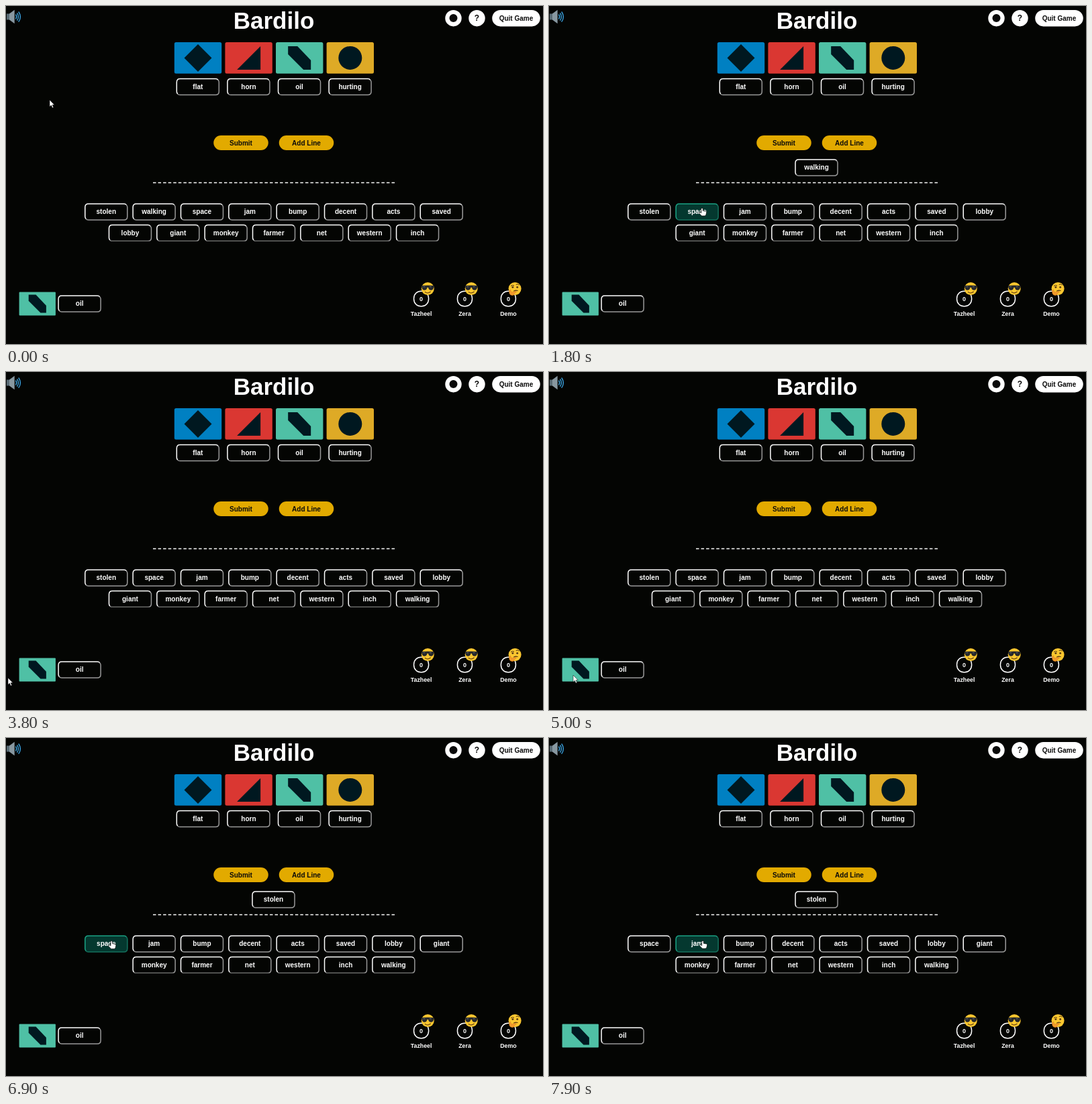
Animation, 800 px wide and 504 px high, one loop 8000 ms. Source, as an HTML page:

```html
<!DOCTYPE html>
<html lang="en">
<head>
<meta charset="utf-8">
<title>Word game</title>
<style>
  html, body { margin: 0; width: 100%; height: 100%; overflow: hidden; background: #040503; }
  svg { display: block; width: 800px; height: 504px; }
  text {
    font: bold 10px "Liberation Sans", Arial, sans-serif;
    fill: #fff; text-anchor: middle;
  }
  .dark { fill: #0a0a0a; }
  .box { fill: #040503; }
  .lit, .dim { fill: none; stroke: #fff; stroke-width: 1.5; }
  .dim { stroke: #999; }
  .hover .box { fill: #04382f; }
  .hover .lit { stroke: #1aa284; }
  .hover .dim { stroke: #14705c; }
</style>
</head>
<body>
<svg id="stage" viewBox="0 0 800 504" xmlns="http://www.w3.org/2000/svg"></svg>
<script>
const LOOP = 8000, STEP = 100;
const MID = 399, GAP = 71.35, PER_ROW = 8;
const LINE = { x: 398.5, y: 241 };
const INK = '#001820', GREEN = '#4fc0a5', GOLD = '#e2aa00';

const WORDS = ('stolen walking space jam bump decent acts saved ' +
  'lobby giant monkey farmer net western inch').split(' ');

// Pointer stops: time, x, y
const STOPS = [
  [0, 65, 140], [300, 16, 9], [600, 331, 150], [900, 223, 300], [1100, 229, 301],
  [1200, 229, 301], [1600, 225, 303], [1800, 228, 301], [1900, 227, 302],
  [2200, 227, 302], [2600, 402, 235], [2900, 402, 235], [3800, 3, 456],
  [4100, 58, 465], [4400, 148, 452], [4700, 96, 437], [5000, 36, 452],
  [5300, 84, 403], [5450, 146, 424], [5600, 74, 441], [6200, 129, 322],
  [6400, 150, 303], [6800, 150, 303], [7300, 219, 297], [7500, 236, 304],
  [7700, 247, 305], [7800, 266, 304], [7900, 229, 302], [8000, 229, 302]
];

const label = (x, y, str, size = 10, cls = '') =>
  `<text x="${x}" y="${y}" class="${cls}" style="font-size:${size}px">${str}</text>`;
const rect = (x, y, w, h, r, fill) =>
  `<rect x="${x}" y="${y}" width="${w}" height="${h}" rx="${r}" fill="${fill}"/>`;
const circle = (x, y, r, fill) => `<circle cx="${x}" cy="${y}" r="${r}" fill="${fill}"/>`;
const path = (d, fill, extra = '') => `<path d="${d}" fill="${fill}" ${extra}/>`;
const stroke = (d, color, w) =>
  path(d, 'none', `stroke="${color}" stroke-width="${w}" stroke-linecap="round"`);
const at = (x, y, inner, more = '') => `<g transform="translate(${x} ${y})" ${more}>${inner}</g>`;

// Outset button centred on its own origin
const button = str =>
  '<rect class="box" x="-32" y="-12" width="64" height="24" rx="5"/>' +
  '<path class="dim" d="M30.1-10.3Q31.5-9 31.5-7V7Q31.5 12 26.5 12H-26.5Q-29 12-30.1 10.5"/>' +
  '<path class="lit" d="M-30.1 10.5Q-31.5 9-31.5 7V-7Q-31.5-12-26.5-12H26.5Q29-12 30.1-10.3"/>' +
  label(0, 3.1, str);

const pill = (x, y, w, h, fill, str) =>
  rect(x - w / 2, y - h / 2, w, h, h / 2, fill) + label(x, y + 3.5, str, 10, 'dark');

const slab = path('M-17-17.5H-3L17 3.5V17.5H6L-17-5.5Z', INK);

function cards() {
  const list = [
    ['flat', '#0080c2', path('M0-20.5L20.5 0 0 20.5-20.5 0Z', INK)],
    ['horn', '#da3732', path('M17.5-17.5V17.5H-17.5Z', INK)],
    ['oil', GREEN, slab],
    ['hurting', '#deaa26', circle(0, 0, 17.5, INK)]
  ];
  return list.map(([word, fill, shape], i) => {
    const x = 286 + i * 75.6;
    return at(x, 77.4, rect(-35.2, -23.3, 70.4, 46.6, 2.5, fill) + shape) +
      at(x - 0.2, 120.6, button(word));
  }).join('');
}

const face = circle(0, 0, 9.5, '#fbc72f');
const cool = face +
  path('M-9.3-4.5Q0-5.3 9.3-4.5L9-2.8Q8.5 2.3 4.8 2.3 1.5 2.3.8-1.8H-.8Q-1.5 2.3-4.8 2.3-8.5 2.3-9-2.8Z', '#26282b') +
  stroke('M-6.5-2.8L-4.5-2.8M3-2.8L5-2.8', '#74797d', .8) +
  stroke('M-4 5Q0 7.8 4.2 4.6', '#6b4512', 1.2);
const thinking = face +
  circle(-3.2, -2.2, 1.4, '#4d3213') + circle(3.6, -2.2, 1.4, '#4d3213') +
  stroke('M-5.8-4.3Q-3.8-5.8-1.5-4.7M2-6.2Q4.4-7.6 6.4-5.6', '#4d3213', 1) +
  stroke('M-1.5 3.4Q1.2 2 4 3', '#4d3213', 1.1) +
  path('M-8.5 3.2Q-7-.2-5.9 3.2L-5.6 5.2 1 4Q2.8 4.2 1.8 5.7L-1 6.7Q0 9.8-4 9.9-8.8 9.8-8.5 3.2Z',
    '#f29a2e', 'stroke="#d97c19" stroke-width=".5"');

const player = (x, name, mood) =>
  `<rect x="${x - 11}" y="425.2" width="22" height="22.6" rx="10.5" fill="none" stroke="#fff" stroke-width="1.5"/>` +
  label(x, 439.5, '0', 9) + label(x, 461.5, name, 8.8) + at(x + 9.7, 421.5, mood);

const speaker =
  path('M1 11.5H6V20.5H1Z', '#596b75') +
  path('M5 11.5L12.7 5.8V26.3L5 20.5Z', '#8797a0') +
  stroke('M14.7 13Q16.7 16 14.7 19M16.8 11Q20 16 16.8 21.2M19 9Q23.8 16 19 23.2', '#3aa0dc', 1.4);

const stage = document.getElementById('stage');
stage.innerHTML =
  '<defs><clipPath id="shelf"><rect width="800" height="350.8"/></clipPath></defs>' +
  '<rect width="800" height="504" fill="#040503"/>' +
  speaker + label(399, 34, 'Bardilo', 35) +
  circle(666.5, 18.2, 12.2, '#fff') + circle(666.5, 18, 6, '#0a0a0a') +
  circle(701.5, 18.2, 12.2, '#fff') + label(701.5, 22.4, '?', 12, 'dark') +
  pill(760, 18.2, 71.5, 24.5, '#fff', 'Quit Game') +
  cards() +
  pill(350, 204, 81.5, 22, GOLD, 'Submit') + pill(447.5, 204, 81.5, 22, GOLD, 'Add Line') +
  path('M219 263.5H579', 'none', 'stroke="#fff" stroke-width="1.5" stroke-dasharray="4.5 3.064"') +
  '<g clip-path="url(#shelf)">' + WORDS.map(w => `<g class="word">${button(w)}</g>`).join('') + '</g>' +
  rect(19.6, 426.4, 54.3, 35, 1, GREEN) + at(46.8, 444, slab, 'class="mini"') +
  at(109.6, 444, button('oil')) +
  player(618.6, 'Tazheel', cool) + player(683.5, 'Zera', cool) + player(748.4, 'Demo', thinking) +
  '<g id="pointer">' +
  path('M0 0V10.2L2.4 8.1 4 11.9 5.7 11.2 4.1 7.5H7.2Z', '#fff', 'id="arrow" stroke="#000" stroke-width=".5"') +
  path('M-1.3 6.5V.9Q0-.6 1.3.9V4.2L5.6 5Q6.9 5.3 6.7 6.8L6 10Q5.6 12 4 12H.3Q-1 12-1.8 10.8L-4.8 7.6Q-4.5 6-3 6.4L-1.3 7.6Z',
    '#fff', 'id="hand" stroke="#000" stroke-width=".7"') +
  '</g>';

const mini = stage.querySelector('.mini');
mini.setAttribute('transform', mini.getAttribute('transform') + ' scale(.77)');

const nodes = [...stage.querySelectorAll('.word')];
const [pointer, arrow, hand] = ['pointer', 'arrow', 'hand'].map(id => document.getElementById(id));

function pointerAt(t) {
  const i = Math.max(1, STOPS.findIndex(s => s[0] >= t));
  const [t0, x0, y0] = STOPS[i - 1], [t1, x1, y1] = STOPS[i];
  const k = (t - t0) / (t1 - t0), e = k * k * (3 - 2 * k);
  return { x: x0 + (x1 - x0) * e, y: y0 + (y1 - y0) * e };
}

// Word on the clue line, and the order of those left on the shelf
function wordsAt(t) {
  if (t < 1300) return { chosen: '', shelf: WORDS };
  const rest = WORDS.filter(w => w !== 'walking');
  if (t < 3000) return { chosen: 'walking', shelf: rest };
  const back = [...rest, 'walking'];
  return t < 6900 ? { chosen: '', shelf: back } : { chosen: 'stolen', shelf: back.slice(1) };
}

function place(word, { chosen, shelf }) {
  if (word === chosen) return LINE;
  const i = shelf.indexOf(word), row = Math.floor(i / PER_ROW);
  const count = row ? shelf.length - PER_ROW : PER_ROW;
  return { x: MID + (i % PER_ROW - (count - 1) / 2) * GAP, y: 307 + row * 31.6 };
}

function draw(time) {
  const t = Math.floor(time % LOOP / STEP) * STEP;
  const p = pointerAt(t), state = wordsAt(t);
  let over = p.x < 22 && p.y < 27;
  nodes.forEach((node, i) => {
    const { x, y } = place(WORDS[i], state);
    const hit = Math.abs(p.x - x) < 32.3 && Math.abs(p.y - y) < 12.7;
    node.setAttribute('transform', `translate(${x} ${y})`);
    node.classList.toggle('hover', hit);
    over = over || hit;
  });
  pointer.setAttribute('transform', `translate(${p.x} ${p.y})`);
  arrow.style.display = over ? 'none' : '';
  hand.style.display = over ? '' : 'none';
}

function tick() {
  draw(performance.now());
  requestAnimationFrame(tick);
}
tick();
</script>
</body>
</html>
```
